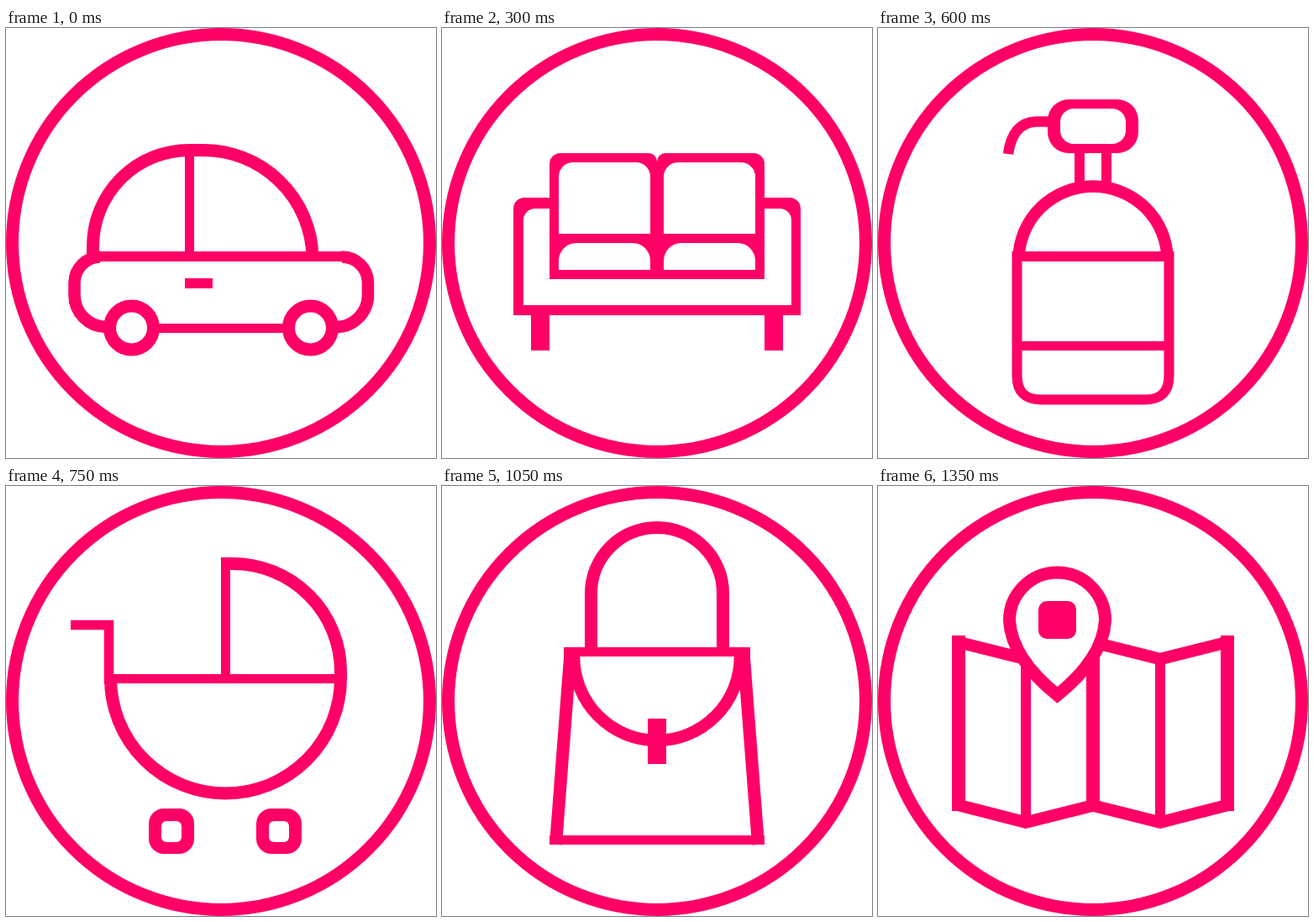
These frames come from a looping animation (512 px wide and 512 px high, 1500 ms). An HTML page with a canvas:

```html
<!DOCTYPE html>
<html lang="en">
<head>
<meta charset="utf-8">
<title>Icons</title>
<style>
html, body { margin: 0; width: 100%; height: 100%; overflow: hidden; background: #fff; }
canvas { display: block; width: 512px; height: 512px; }
</style>
</head>
<body>
<canvas id="stage" width="512" height="512"></canvas>
<script>
const ctx = document.getElementById('stage').getContext('2d');
const PINK = '#ff0066', WHITE = '#fff';
const STEP = 150;

function line(d, width) {
  ctx.lineWidth = width;
  ctx.stroke(new Path2D(d));
}

function ring(x, y, r, width) {
  ctx.lineWidth = width;
  ctx.beginPath();
  ctx.arc(x, y, r, 0, Math.PI * 2);
  ctx.stroke();
}

// Box given by its left, top, right and bottom edges.
function box(l, t, r, b, radii = 0, color = PINK) {
  ctx.fillStyle = color;
  ctx.beginPath();
  ctx.roundRect(l, t, r - l, b - t, radii);
  ctx.fill();
}

function car() {
  line('M103.5 272V260A114.5 114.5 0 0 1 218 145.5H235A130 130 0 0 1 365 272', 15);
  box(213, 146, 224, 272);
  box(106, 266, 404, 278);
  line('M112 272.5A31 31 0 0 0 81.5 303V318A38 38 0 0 0 119 356', 14.5);
  line('M400 272.5A31 31 0 0 1 431 303V318A38 38 0 0 1 393 356', 14.5);
  box(180, 352, 332, 363);
  ring(149.5, 357, 26, 15);
  ring(362.5, 357, 26, 15);
  box(213, 298, 246, 310);
}

function sofa() {
  box(85, 202, 427, 342, [13, 13, 0, 0]);
  box(97, 215, 416, 330, [14, 14, 0, 0], WHITE);
  box(128, 149, 256, 299, [13, 10, 0, 0]);
  box(256, 149, 384, 299, [10, 13, 0, 0]);
  for (const x of [139, 264]) {
    box(x, 160, x + 109, 245, [17, 17, 0, 0], WHITE);
    box(x, 256, x + 109, 288, [21, 21, 0, 0], WHITE);
  }
  box(106, 342, 128, 384);
  box(384, 342, 406, 384);
}

function pump() {
  box(202, 85, 310, 149, 25);
  box(217, 96, 295, 138, 16, WHITE);
  line('M205 111.5H188Q160 113 155 150', 12.5);
  box(234, 147, 246, 184);
  box(266, 147, 278, 184);
  line('M167.5 276A88.5 87.5 0 0 1 344.5 276', 14.5);
  line('M165.5 266V414Q165.5 442.5 194 442.5H318Q346.5 442.5 346.5 414V266', 12);
  box(166, 266, 346, 278);
  box(166, 373, 346, 384);
}

function pram() {
  line('M77 165.5H122.5V236', 11.5);
  box(117, 224, 400, 235);
  box(256, 85, 267, 230);
  line('M256 92.5H270A128.5 128.5 0 0 1 398.5 221V229A137 137 0 0 1 124.5 229', 15);
  for (const x of [197, 325]) {
    box(x - 27, 384, x + 27, 438, 18);
    box(x - 12, 399, x + 12, 424, 6, WHITE);
  }
}

function bag() {
  line('M177.5 194V128A78.5 78.5 0 0 1 334.5 128V194', 15);
  box(145, 192, 367, 203);
  box(128, 416, 384, 427);
  line('M153 198L135.5 427M359 198L376.5 427', 15);
  line('M157 203A99 100 0 0 0 355 203', 14.5);
  box(245, 277, 267, 331);
}

function ball() {
  ring(256, 256, 142.5, 15);
  box(248, 110, 264, 402);
  box(110, 248, 402, 264);
  line('M155 155A145 145 0 0 1 155 357M357 155A145 145 0 0 0 357 357', 15);
}

function map() {
  line('M92 185L176 206M256 186L336 206L420 185', 14.5);
  line('M92 379L176 400.5L256 380.5L336 400.5L420 379', 14.5);
  box(88, 178, 104, 387);
  box(170, 206, 182, 402);
  box(248, 192, 264, 384);
  box(330, 204, 342, 402);
  box(408, 178, 424, 387);
  const pin = 'M156.5 160A57 57 0 0 1 270.5 160Q268 205 213.5 249Q159 205 156.5 160Z';
  ctx.fillStyle = WHITE;
  ctx.fill(new Path2D(pin));
  line(pin, 15);
  box(191, 137, 236, 182, 10);
}

const icons = [car, car, sofa, pump, pump, pram, pram, bag, ball, map];
let shown = -1;

function draw(now) {
  const i = Math.floor(now / STEP) % icons.length;
  if (i !== shown) {
    shown = i;
    ctx.fillStyle = WHITE;
    ctx.fillRect(0, 0, 512, 512);
    ctx.strokeStyle = PINK;
    ring(256, 256, 248.5, 15);
    icons[i]();
  }
}

const start = performance.now();
function tick() {
  draw(performance.now() - start);
  requestAnimationFrame(tick);
}
tick();
</script>
</body>
</html>
```
